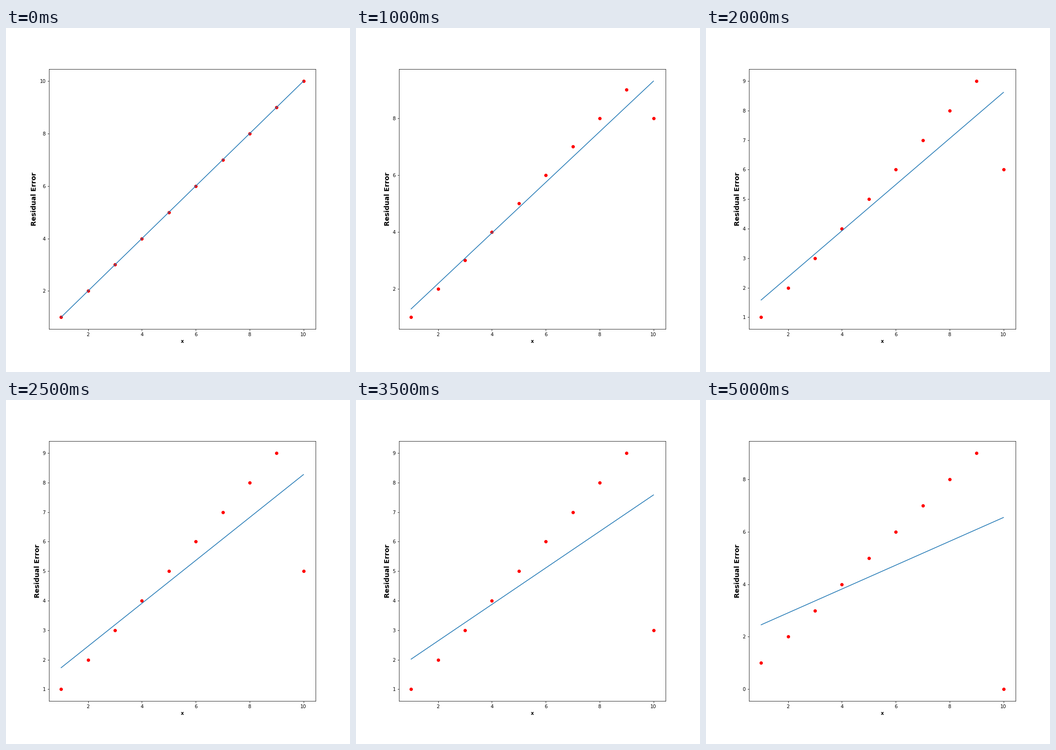
Recreate the animation shown at these times as a matplotlib script. Size 720x720 px, loop 5.5 s.

```python
import matplotlib.pyplot as plt
import numpy as np
from matplotlib.animation import FuncAnimation

STEPS = 11
STEP_MS = 500

plt.rcParams["font.family"] = "DejaVu Sans"
plt.rcParams["font.size"] = 10

fig, ax = plt.subplots(figsize=(10, 10), dpi=72, facecolor="white")
fig.subplots_adjust(left=0.125, right=0.9, bottom=0.125, top=0.88)

x = np.arange(1, 11)


def draw(step):
    # The last sample sinks by one each step and drags the least-squares fit down.
    y = x.astype(float)
    y[-1] -= step
    slope, intercept = np.polyfit(x, y, 1)

    ax.clear()
    ax.scatter(x, y, color="red")
    ax.plot(x, slope * x + intercept, color="#1f77b4")
    ax.set_xlabel("x", fontweight="bold")
    ax.set_ylabel("Residual Error", fontsize=14, fontweight="bold")
    return []


anim = FuncAnimation(fig, draw, frames=STEPS, init_func=lambda: draw(0),
                     interval=STEP_MS, repeat=True, repeat_delay=0)

plt.show()
```
